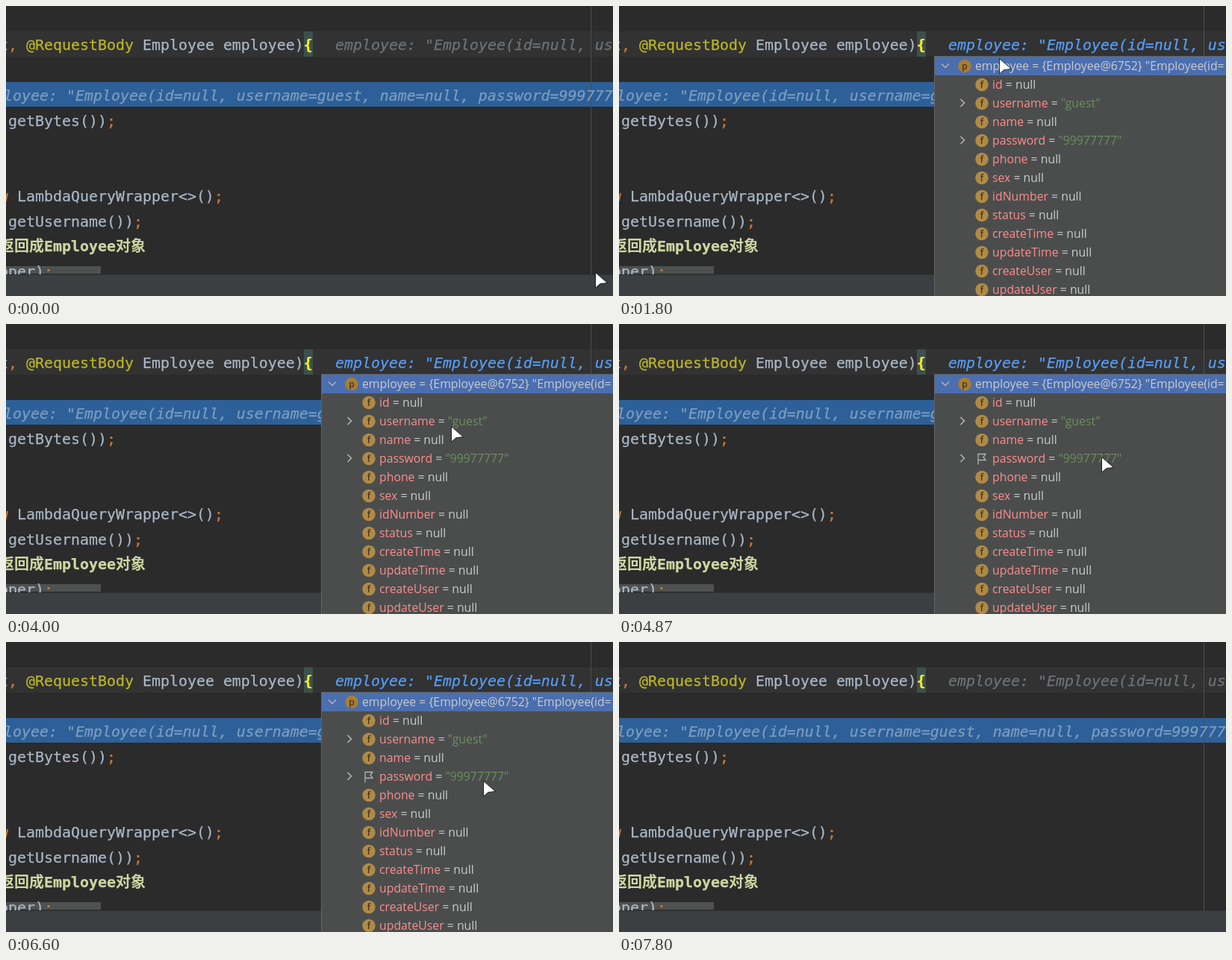
An HTML page for the animation above (7.87 s loop, 813 by 389 pixels).

```html
<!DOCTYPE html>
<html lang="en">
<head>
<meta charset="utf-8">
<title>Inspecting a variable</title>
<style>
  html, body { margin: 0; width: 100%; height: 100%; overflow: hidden; background: #2b2b2b; }
  svg { display: block; width: 813px; height: 389px; }
  text { white-space: pre; fill: currentColor; }
  .code { font: 19.93px "DejaVu Sans Mono", "Noto Sans Mono", monospace; stroke: currentColor; stroke-width: .25px; }
  .ui { font: 15.8px "Open Sans", "Noto Sans", sans-serif; }
  .cjk { font: bold 20px "Noto Sans CJK SC", "Noto Sans CJK", sans-serif; stroke-width: 0; }
  .hint { font-style: italic; }
  .icon { font: 600 12px "Open Sans", sans-serif; text-anchor: middle; color: #3f3626; }
  .chevron { fill: none; stroke: #b4b6b7; stroke-width: 1.5; }
  .cursor path { fill: #fff; stroke: #111; stroke-width: .9; stroke-linejoin: round; }
  .hidden { display: none; }
</style>
</head>
<body>
<svg viewBox="0 0 813 389">
  <defs><clipPath id="editorClip"><rect width="813" height="360"/></clipPath></defs>
  <rect width="813" height="389" fill="#2b2b2b"/>
  <rect y="34" width="813" height="34" fill="#323232"/>
  <rect x="399" y="34" width="12" height="34" fill="#3b514d"/>
  <rect y="102" width="813" height="33" fill="#2d6099"/>
  <rect x="783" width="1" height="360" fill="#4b4d4e"/>
  <rect y="349" width="127" height="10" fill="#4f5050"/>
  <g id="editor" class="code" clip-path="url(#editorClip)"></g>
  <rect y="360" width="813" height="29" fill="#3c3f41"/>
  <rect y="360" width="813" height="1" fill="#323435"/>
  <g id="small" class="ui">
    <rect x="422" y="67" width="391" height="95" fill="#616466"/>
    <rect x="423" y="68" width="390" height="58" fill="#4b4d4d"/>
    <rect x="423" y="126" width="390" height="35" fill="#3d4245"/>
    <rect x="424" y="116" width="132" height="10" fill="#666868"/>
  </g>
  <g id="large" class="ui">
    <rect x="422" y="67" width="391" height="322" fill="#616466"/>
    <rect x="423" y="68" width="390" height="321" fill="#4b4d4d"/>
  </g>
  <g id="arrow" class="cursor"><path d="M.5 .5V21L7 15.5 16.5 14.5Z"/></g>
  <g id="hand" class="cursor">
    <path d="M-2 2Q0-1 2.5 2V9Q4.5 7.5 6 10Q8 9 9 11.5Q11 11 11 14V19Q11 21 9 25H-1Q-2 21-6 17.5Q-8.5 14-5 14L-2 16Z"/>
    <path d="M2.500 9V13M6 10V13.500M9 11.500V14"/>
  </g>
  <g id="beam" class="cursor"><path d="M-4-10H4V-9H.5V9H4V10H-4V9H-.5V-9H-4Z" style="stroke-width:.3"/></g>
</svg>
<script>
const $ = id => document.getElementById(id);
const NS = "http://www.w3.org/2000/svg";
const PLAIN = "#a9b7c6", ORANGE = "#cc7832", DOC = "#ced6a2", BLUE = "#589df6", LIGHT = "#cacccd";
const ROW = 25, LIST_TOP = 93;

function add(parent, tag, attrs, content = "") {
  const node = parent.appendChild(document.createElementNS(NS, tag));
  for (const key in attrs) node.setAttribute(key, attrs[key]);
  node.textContent = content;
  return node;
}

// Each part is [text, colour, extra attributes].
function write(parent, x, y, ...parts) {
  const line = add(parent, "text", { x, y });
  for (const [content, color, extra] of parts)
    add(line, "tspan", { style: `color:${color}`, ...extra }, content);
}

const editor = $("editor"), small = $("small"), large = $("large");
const bold = { "font-weight": "bold" }, cjk = { class: "cjk" };

// Columns are 12 px wide; every code line starts on one of two of them.
const lineY = n => Math.round(59.3 + 33.75 * n);
write(editor, -9, lineY(0), ["t", PLAIN], [", ", ORANGE], ["@RequestBody", "#bbb529"],
  [" Employee employee)", PLAIN], ["{", "#ffef28", bold]);
write(editor, 3, lineY(3), ["getBytes())", PLAIN], [";", ORANGE]);
write(editor, -9, lineY(6), ["w ", ORANGE], ["LambdaQueryWrapper<>()", PLAIN], [";", ORANGE]);
write(editor, 3, lineY(7), ["getUsername())", PLAIN], [";", ORANGE]);
write(editor, -9, lineY(8), ["返回成", DOC, cjk], ["Employee", DOC, bold], ["对象", DOC, cjk]);
write(editor, -9, lineY(9), ["pper)", PLAIN], [";", ORANGE]);

const hint = (x, n, content) => add(editor, "text", { x, y: lineY(n), class: "hint" }, content);
const topHint = hint(441, 0, 'employee: "Employee(id=null, us');
const lineHint = hint(-39, 2, 'employee: "Employee(id=null, username=guest, name=null, password=999777');

function badge(parent, x, y, letter, color) {
  const group = add(parent, "g", {});
  add(group, "circle", { cx: x, cy: y, r: 8.7, fill: color });
  add(group, "text", { x, y: y + 4, class: "icon" }, letter);
  return group;
}

function chevron(parent, x, y, open) {
  const d = open ? `M${x - 5} ${y - 2.5}l5 5 5-5` : `M${x - 2.5} ${y - 5}l5 5-5 5`;
  add(parent, "path", { d, class: "chevron" });
}

for (const popup of [small, large]) {
  add(popup, "rect", { x: 423, y: 68, width: 390, height: ROW, fill: "#4b6eaf" });
  chevron(popup, 437, 80, popup === large);
  badge(popup, 463, 80.5, "p", "#aa7d30");
  write(popup, 477, 86, ['employee = {Employee@6752} "Employee(id=', LIGHT]);
}
write(small, 437, 151, ["Set Value", BLUE]);
write(small, 516, 151, ["F2", "#929597"]);
write(small, 562, 151, ["Create Renderer", BLUE]);
write(small, 702, 151, ["Add as Inline W", BLUE]);

const fields = "id username name password phone sex idNumber status createTime updateTime createUser updateUser";
const values = { username: '"guest"', password: '"99977777"' };
const markable = [];
fields.split(" ").forEach((field, row) => {
  const y = LIST_TOP + ROW * (row + .5), value = values[field];
  const icon = badge(large, 486, y, "f", "#b08a45");
  write(large, 500, y + 5.5, [field, "#ff8c8c"], [" = ", LIGHT],
    [value || "null", value ? "#6a8f5c" : LIGHT]);
  if (!value) return;
  chevron(large, 460, y - .5, false);
  const flag = add(large, "path", {
    d: `M481 ${y + 8}v-14h10l-3 4 3 4h-10`, fill: "none", stroke: "#b0b3b5", "stroke-width": 1.3 });
  markable.push({ row, icon, flag });
});

// Gestures of the pointer: start, duration, x, y. It rests in between.
const moves = [
  [0, 530, 496, 58], [1600, 800, 581, 137], [2400, 330, 601, 145],
  [3000, 400, 639, 140], [3400, 400, 611, 117], [3800, 200, 596, 137],
  [4000, 270, 600, 167], [4470, 730, 680, 187], [5200, 400, 583, 163],
  [5600, 470, 558, 179], [6270, 330, 639, 186], [6600, 470, 474, 282],
  [7070, 260, 112, 400]
];
const LOOP = 7870, TICK = 200 / 3, MARK_DELAY = 200;
const OPEN = 1070, EXPAND = 1270, LEAVE = 7330, CLOSE = 7800;

function pointerAt(t) {
  let x = 789, y = 357;
  for (const [start, duration, toX, toY] of moves) {
    const k = Math.min(1, Math.max(0, (t - start) / duration));
    const eased = k * k * (3 - 2 * k);
    x += (toX - x) * eased;
    y += (toY - y) * eased;
  }
  return { x: Math.round(x), y: Math.round(y) };
}

const rowAt = t => Math.floor((pointerAt(t).y - LIST_TOP) / ROW);
const show = (node, on) => node.classList.toggle("hidden", !on);

function render(time) {
  const t = Math.round(Math.floor((time + 4) / TICK) * TICK / 10) * 10;
  const { x, y } = pointerAt(t);
  const expanded = t >= EXPAND && t < CLOSE;
  const overPopup = expanded && x >= 422 && y >= 67;
  const overTop = x >= 441 && y >= 34 && y < 67;
  const overLine = !overPopup && y >= 102 && y < 135;

  show(small, t >= OPEN && t < EXPAND);
  show(large, expanded);
  topHint.style.color = overTop || overPopup ? BLUE : "#6c7378";
  lineHint.style.color = overLine ? BLUE : "#7e9cbd";

  // A row gets its flag once the pointer has stayed on it for a moment.
  for (const { row, icon, flag } of markable) {
    const marked = overPopup && rowAt(t) === row && rowAt(t - MARK_DELAY) === row;
    show(icon, !marked);
    show(flag, marked);
  }

  const shape = overLine || overTop ? "hand" : overPopup || y >= 349 ? "arrow" : "beam";
  for (const id of ["arrow", "hand", "beam"]) {
    show($(id), id === shape && t < LEAVE);
    $(id).setAttribute("transform", `translate(${x} ${y})`);
  }
}

const start = performance.now();
function frame() {
  render((performance.now() - start) % LOOP);
  requestAnimationFrame(frame);
}
frame();
</script>
</body>
</html>
```
